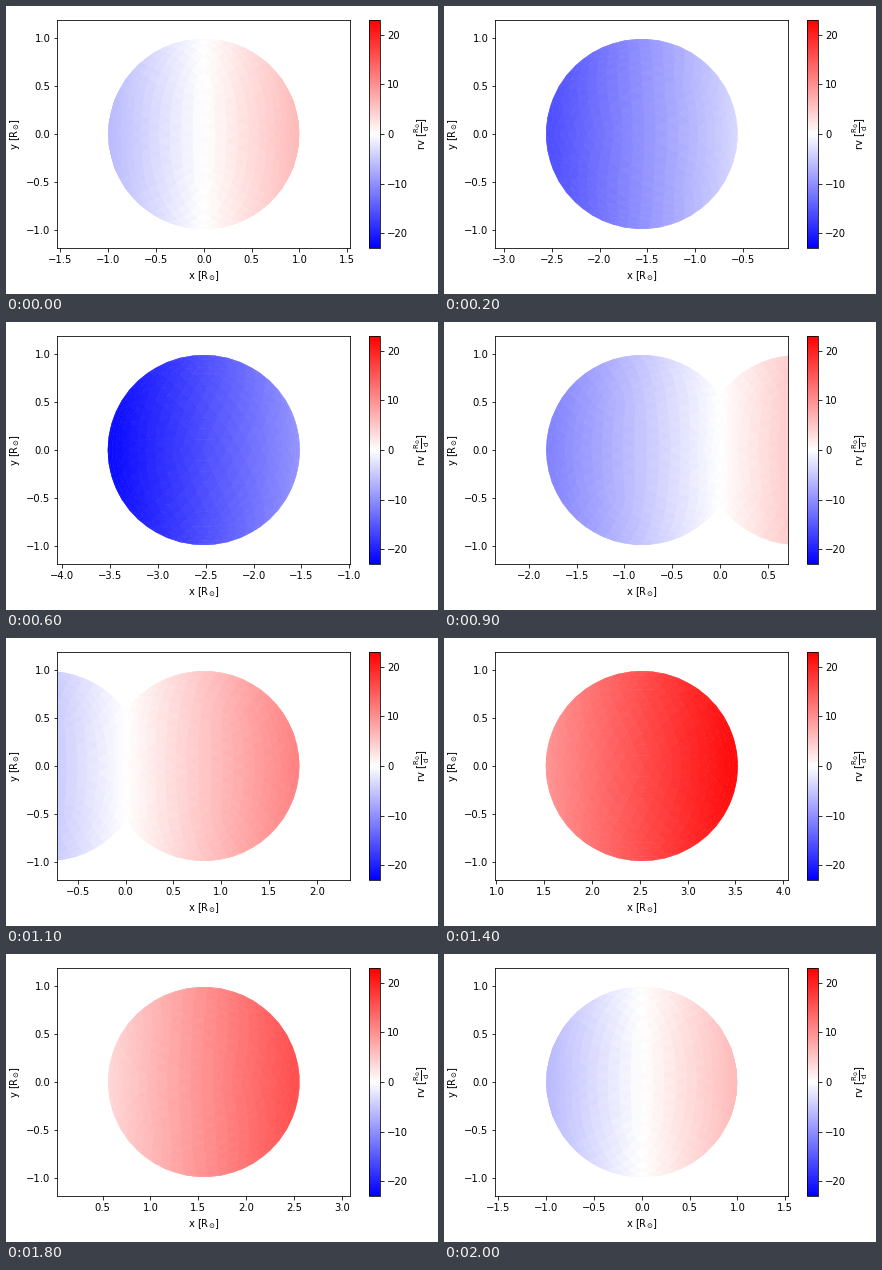
Recreate the animation shown at these times as a matplotlib script. Size 432x288 px, loop 2100 ms.

```python
from itertools import combinations

import matplotlib.pyplot as plt
import numpy as np
from matplotlib.animation import FuncAnimation
from matplotlib.collections import PolyCollection
from matplotlib.colors import Normalize
from matplotlib.ticker import MultipleLocator

W, H, DPI = 432, 288, 72
FRAMES, STEP = 21, 100
ORBIT = 2.65                    # star to barycentre, solar radii
OMEGA = 2 * np.pi               # one orbit per day
SHAPE = (1.0, 0.995, 1.007)     # side, pole, line of centres
UNIT = 95.6                     # pixels per solar radius
BOX = (51.3, 46, 293, 228)
BAR = (362.7, 46, 11.4, 228)


def sphere_mesh(n):
    """Triangles of an icosahedron split n times and pushed to a unit sphere."""
    g = (1 + 5 ** 0.5) / 2
    base = [(0, a, b) for a in (-1, 1) for b in (-g, g)]
    verts = np.array([np.roll(v, k) for k in range(3) for v in base])
    tris = []
    for a, b, c in combinations(verts, 3):
        sides = [np.linalg.norm(p - q) for p, q in ((a, b), (b, c), (c, a))]
        if max(sides) > 2.01:
            continue

        def at(i, j):
            return a + (b - a) * i / n + (c - a) * j / n

        for i in range(n):
            for j in range(n - i):
                tris.append((at(i, j), at(i + 1, j), at(i, j + 1)))
                if i + j < n - 1:
                    tris.append((at(i + 1, j), at(i + 1, j + 1), at(i, j + 1)))
    tris = np.array(tris)
    return tris / np.linalg.norm(tris, axis=2, keepdims=True)


def turn(pts, angle):
    """Rotate about the vertical axis; z points to the viewer."""
    x, y, z = np.moveaxis(pts, -1, 0)
    c, s = np.cos(angle), np.sin(angle)
    return np.stack([x * c + z * s, y, z * c - x * s], axis=-1)


def add_box(px):
    x, y, w, h = px
    return fig.add_axes([x / W, y / H, w / W, h / H])


star = sphere_mesh(9) * SHAPE
pair = np.concatenate([star - (0, 0, ORBIT), star + (0, 0, ORBIT)])

plt.rcParams.update({"font.family": "DejaVu Sans", "font.size": 10})
fig = plt.figure(figsize=(W / DPI, H / DPI), dpi=DPI, facecolor="white")
ax, cax = add_box(BOX), add_box(BAR)

vmax = OMEGA * (ORBIT + 1)
mesh = PolyCollection([], cmap="bwr", norm=Normalize(-vmax, vmax),
                      edgecolors="none", linewidths=0)
ax.add_collection(mesh, autolim=False)
half_w, half_h = BOX[2] / UNIT / 2, BOX[3] / UNIT / 2
ax.set_ylim(-half_h, half_h)
for axis in (ax.xaxis, ax.yaxis):
    axis.set_major_locator(MultipleLocator(0.5))
ax.set_xlabel(r"x [$\mathrm{R_{\odot}}$]")
ax.set_ylabel(r"y [$\mathrm{R_{\odot}}$]")

bar = fig.colorbar(mesh, cax=cax)
bar.set_ticks([-20, -10, 0, 10, 20])
bar.set_label(r"rv [$\mathrm{\frac{R_{\odot}}{d}}$]")


def update(i):
    phase = 2 * np.pi * i / (FRAMES - 1)
    tris = turn(pair, phase)
    tris = tris[np.argsort(tris[:, :, 2].mean(axis=1))]
    mesh.set_verts(tris[:, :, :2])
    # synchronous rotation: radial velocity grows linearly with x
    mesh.set_array(OMEGA * tris[:, :, 0].mean(axis=1))
    centre = -ORBIT * np.sin(phase)
    ax.set_xlim(centre - half_w, centre + half_w)
    return [mesh]


anim = FuncAnimation(fig, update, frames=FRAMES, interval=STEP,
                     repeat=True, repeat_delay=0, blit=False)
plt.show()
```
